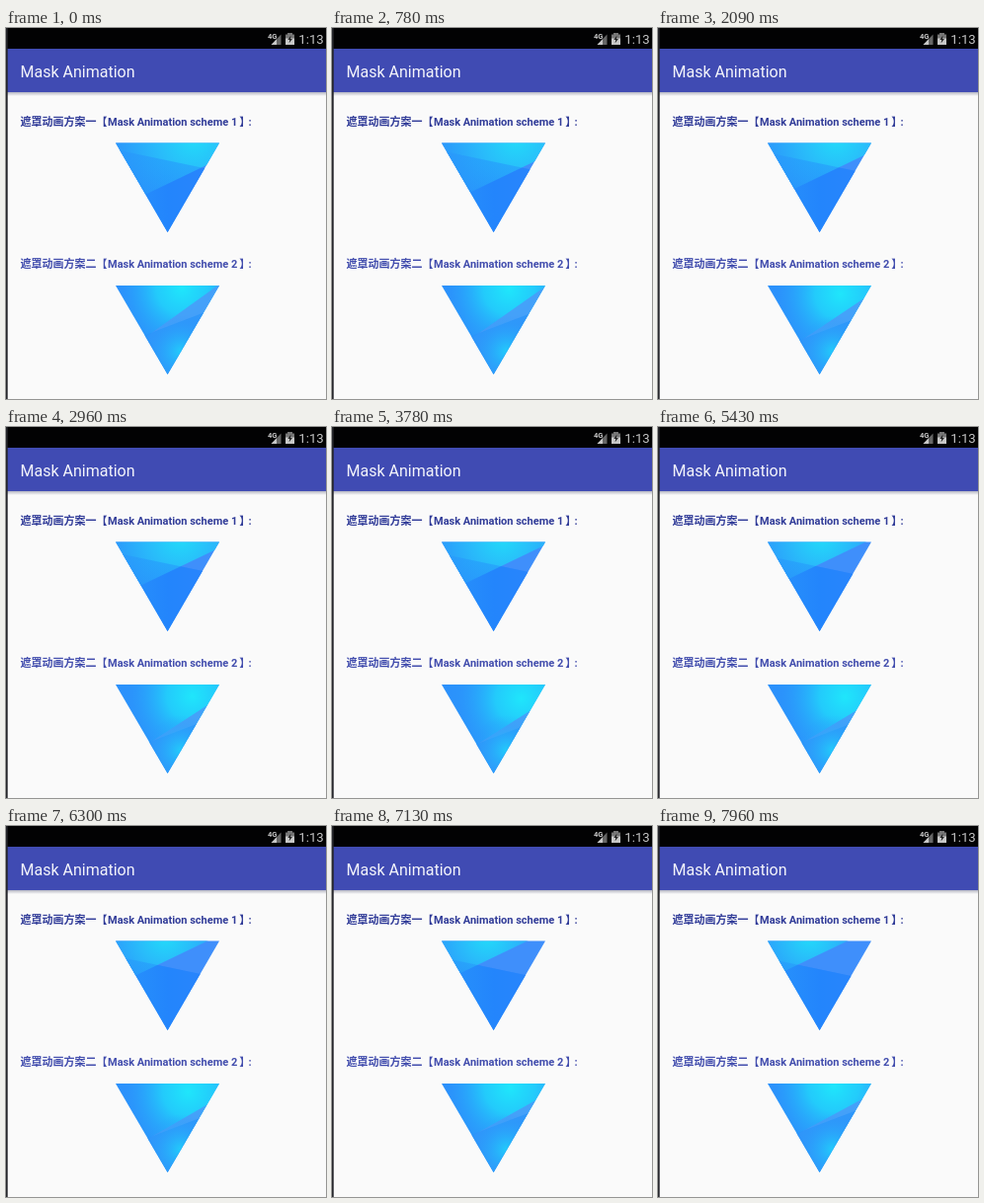
Recreate the animation shown at these times as an HTML page. Size 324 px wide and 376 px high, loop 8000 ms.

```html
<!DOCTYPE html>
<html lang="zh">
<head>
<meta charset="utf-8">
<title>Mask Animation</title>
<style>
  html, body { margin: 0; width: 100%; height: 100%; overflow: hidden; background: #fafafa; }
  svg { display: block; width: 324px; height: 376px; }
  text { font-family: Roboto, "Noto Sans CJK SC", "Noto Sans CJK", sans-serif; }
  .label { font-size: 11px; font-weight: 700; }
</style>
</head>
<body>
<svg viewBox="0 0 324 376">
  <defs>
    <clipPath id="mask1"><path d="M111 116.4H216L163.6 206.9Z"/></clipPath>
    <clipPath id="mask2"><path d="M111 261H216L163.6 351Z"/></clipPath>
    <linearGradient id="shadow" x2="0" y2="1">
      <stop stop-color="#b4b6c2"/><stop offset="1" stop-color="#fafafa"/>
    </linearGradient>
    <linearGradient id="deep" gradientUnits="userSpaceOnUse" x1="112" y1="0" x2="216" y2="0">
      <stop stop-color="#2894fb"/><stop offset=".5" stop-color="#2385fc"/><stop offset="1" stop-color="#2b85fc"/>
    </linearGradient>
    <radialGradient id="cyan" gradientUnits="userSpaceOnUse" cx="190" cy="112" r="78">
      <stop stop-color="#22dbf9"/><stop offset=".45" stop-color="#29bdfa"/><stop offset="1" stop-color="#2b98fb"/>
    </radialGradient>
    <linearGradient id="sky" gradientUnits="userSpaceOnUse" x1="112" y1="300" x2="216" y2="290">
      <stop stop-color="#2b8ffb"/><stop offset="1" stop-color="#2ba8fb"/>
    </linearGradient>
    <radialGradient id="glow" gradientUnits="userSpaceOnUse" cx="180" cy="264" r="64">
      <stop stop-color="#1fe6fb"/><stop offset=".4" stop-color="#22d0fb" stop-opacity=".9"/>
      <stop offset="1" stop-color="#2a9efb" stop-opacity="0"/>
    </radialGradient>
    <radialGradient id="pool" gradientUnits="userSpaceOnUse" cx="177" cy="328" r="36">
      <stop stop-color="#22ccfb"/><stop offset="1" stop-color="#2a98fb" stop-opacity="0"/>
    </radialGradient>
  </defs>

  <rect width="324" height="376" fill="#fafafa"/>
  <rect width="324" height="21" fill="#020203"/>
  <rect y="21" width="324" height="44" fill="#404bb3"/>
  <rect y="65" width="324" height="4" fill="url(#shadow)"/>
  <rect width="1.7" height="376" fill="#25262b"/>

  <g fill="#c8c8c8">
    <text x="265" y="11" font-size="7.5" font-weight="700">4G</text>
    <path d="M268.5 17L278.5 6.5V17Z" fill="#666"/>
    <path d="M268.5 17L274 11.2V17Z"/>
    <path d="M285 6.5V5H290V6.5H292V17H283V6.5Z" fill="#777"/>
    <path d="M283 10.5H292V17H283Z"/>
    <path d="M288.5 7.5L285.3 12H287.3L286.5 15.5L289.9 11H288Z" fill="#222"/>
    <text x="296.3" y="16.3" font-size="13.2">1:13</text>
  </g>
  <text x="14.5" y="49.5" font-size="16" fill="#f4f5fb">Mask Animation</text>

  <g class="label" fill="#303b98">
    <text x="14.5" y="99">遮罩动画方案一【</text>
    <text x="103" y="99">Mask Animation scheme 1</text>
    <text x="236.3" y="99">】</text><text x="245.5" y="99">:</text>
  </g>
  <g class="label" fill="#414cad">
    <text x="14.5" y="243">遮罩动画方案二【</text>
    <text x="103" y="243">Mask Animation scheme 2</text>
    <text x="236.3" y="243">】</text><text x="245.5" y="243">:</text>
  </g>

  <g clip-path="url(#mask1)">
    <rect x="110" y="116" width="107" height="92" fill="#3f8ffb"/>
    <path id="lower" fill="url(#deep)"/>
    <path id="band" fill="url(#cyan)"/>
    <use href="#lower" opacity=".4"/>
  </g>
  <g clip-path="url(#mask2)">
    <rect x="110" y="260" width="107" height="92" fill="url(#sky)"/>
    <rect x="110" y="260" width="107" height="92" fill="url(#glow)"/>
    <path id="wedge" fill="#4a9bfa" opacity=".85"/>
    <path id="under" fill="#2a95fb" opacity=".8"/>
    <rect x="110" y="260" width="107" height="92" fill="url(#pool)"/>
  </g>
</svg>
<script>
const LOOP = 8000;
const $ = id => document.getElementById(id);
const set = (id, name, value) => $(id).setAttribute(name, value);
const mix = (a, b, k) => a + (b - a) * k;
const line = (y0, slope, x0) => x => y0 + slope * (x - x0);

// Area between a line and a level, across the masks.
const area = (f, level) => `M100 ${level}V${f(100)}L230 ${f(230)}V${level}Z`;

function draw(ms) {
  const s = ms / 1000, k = ms / LOOP;

  // Upper mask: the bright band slides left while the crease sinks.
  set("band", "d", area(line(117, -0.48, 249 - 7.3 * s), 80));
  set("lower", "d", area(line(mix(125, 136, k), 0.21, 119), 220));
  set("cyan", "cx", 190 - 4.5 * s);
  set("cyan", "r", 78 - 3 * s);

  // Lower mask: the folds sink, then return while the glow drifts.
  const dip = ms < 4400 ? ms / 4400 : (LOOP - ms) / (LOOP - 4400);
  const ease = dip * dip * (3 - 2 * dip);
  const y = mix(308, 321, ease);
  set("wedge", "d", area(line(y, mix(-0.72, -0.54, k), 149), 380));
  set("under", "d", area(line(y, -0.38, 149), 380));
  set("glow", "cx", 178 + 14 * ease);
  set("glow", "cy", 264 + 12 * ease);
}

function tick() {
  draw(performance.now() % LOOP);
  requestAnimationFrame(tick);
}
tick();
</script>
</body>
</html>
```
